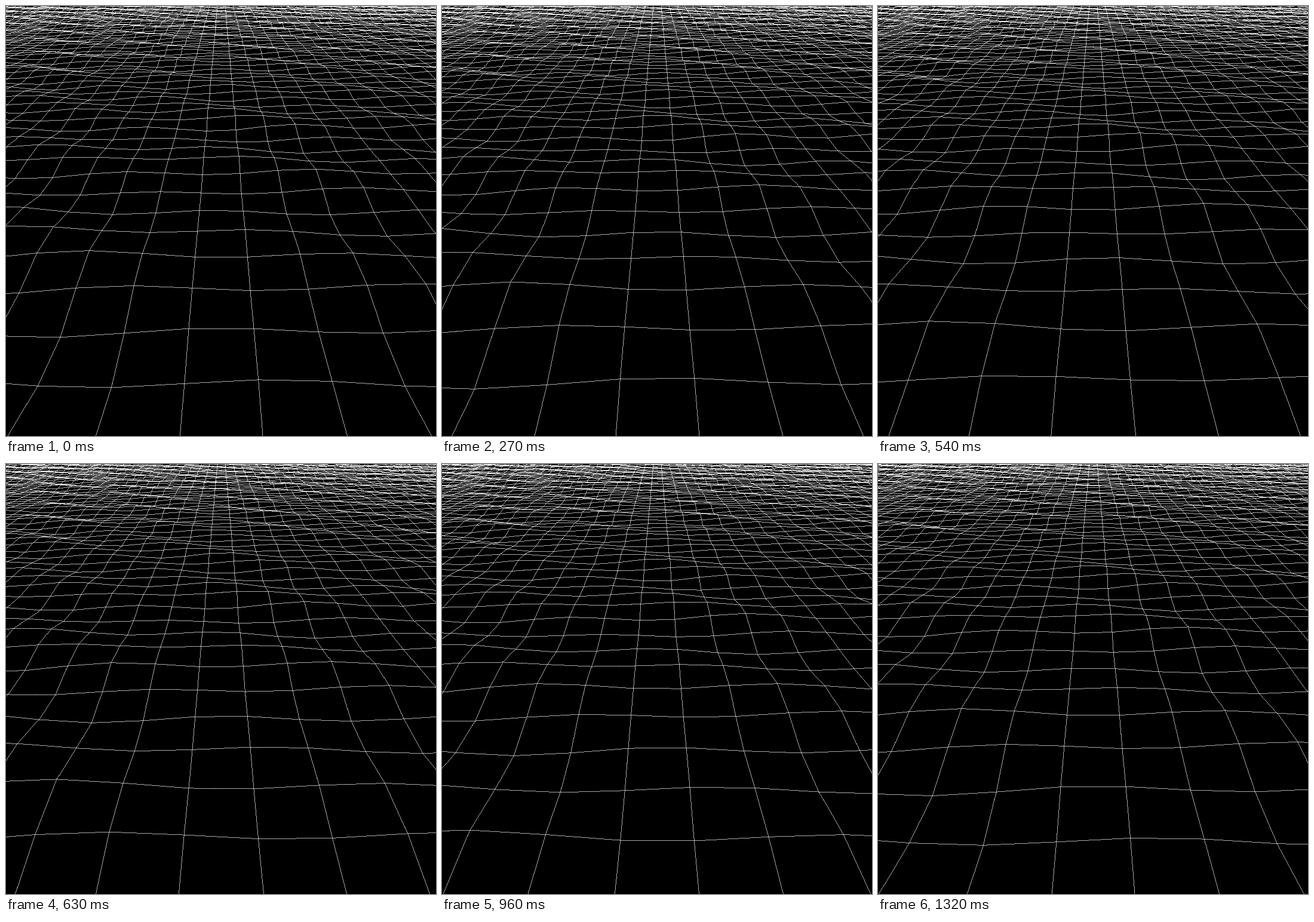
An HTML page with a canvas that plays this animation: 720 by 720 pixels, repeating every 1350 ms.

```html
<!DOCTYPE html>
<html lang="en">
<head>
<meta charset="utf-8">
<title>Wire sea</title>
<style>
  html, body { margin: 0; width: 720px; height: 720px; overflow: hidden; background: #000; }
  canvas { display: block; }
</style>
</head>
<body>
<canvas id="stage" width="720" height="720"></canvas>
<script>
const SIZE = 720, MID = SIZE / 2, LOOP = 1350, STEP = 30, TAU = 2 * Math.PI;
const ROWS = 74, HALF = 38, INK = 0.65;

// Camera: focal length, height above the plane, distance to row 0, pitch
const FOCAL = 785, EYE = 4.948, NEAR_Z = 4.498, PITCH = Math.asin(0.4843);
const SIN = Math.sin(PITCH), COS = Math.cos(PITCH);

let seed = 11;
const random = () => (seed = (seed * 16807) % 2147483647) / 2147483647;
const spread = (mid, width) => mid + (random() - 0.5) * width;

// Swells rolling towards the viewer. A crest passes at loop time
// start + across * x + along * row.
const swells = [
  { lift: 0.068, start: 0.55, across: -0.04, along: -0.2 },
  { lift: 0.07, start: 0.16, across: -0.2, along: -0.245 }
];
for (let i = 0; i < 4; i++) {
  swells.push({ lift: 0.018, start: random(), across: spread(0, 0.5), along: spread(-0.22, 0.2) });
}

const height = (x, row, t) => swells.reduce((sum, w) =>
  sum + w.lift * Math.cos(TAU * (t - w.start - w.across * x - w.along * row)), 0);

function project(x, row, t) {
  const y = height(x, row, t), z = NEAR_Z + row;
  const scale = FOCAL / (z * COS + (EYE - y) * SIN);
  return { x: MID + x * scale, y: MID + ((EYE - y) * COS - z * SIN) * scale };
}

const ctx = document.getElementById("stage").getContext("2d");
const image = ctx.createImageData(SIZE, SIZE);
const pixels = new Uint32Array(image.data.buffer);

function plot(x, y) {
  if (x < 0 || x >= SIZE || y < 0 || y >= SIZE) return;
  const i = y * SIZE + x, old = pixels[i] & 255;
  pixels[i] = 0xff000000 + Math.round(old + (255 - old) * INK) * 0x010101;
}

// Hard one-pixel line, brighter where lines overlap
function line(a, b) {
  if (Math.max(a.x, b.x) < 0 || Math.min(a.x, b.x) > SIZE) return;
  const dx = b.x - a.x, dy = b.y - a.y;
  const n = Math.max(1, Math.ceil(Math.max(Math.abs(dx), Math.abs(dy))));
  for (let i = 0; i < n; i++) {
    plot(Math.round(a.x + dx * i / n), Math.round(a.y + dy * i / n));
  }
}

function draw(t) {
  pixels.fill(0xff000000);
  let last = null;
  for (let row = -1; row < ROWS; row++) {
    const points = [];
    for (let x = 0.5 - HALF; x < HALF; x++) points.push(project(x, row, t));
    points.forEach((p, i) => {
      if (i) line(points[i - 1], p);
      if (last) line(last[i], p);
    });
    last = points;
  }
  ctx.putImageData(image, 0, 0);
}

let shown = -1;
function tick() {
  const time = Math.floor(performance.now() % LOOP / STEP) * STEP;
  if (time !== shown) {
    shown = time;
    draw(time / LOOP);
  }
  requestAnimationFrame(tick);
}
tick();
</script>
</body>
</html>
```
